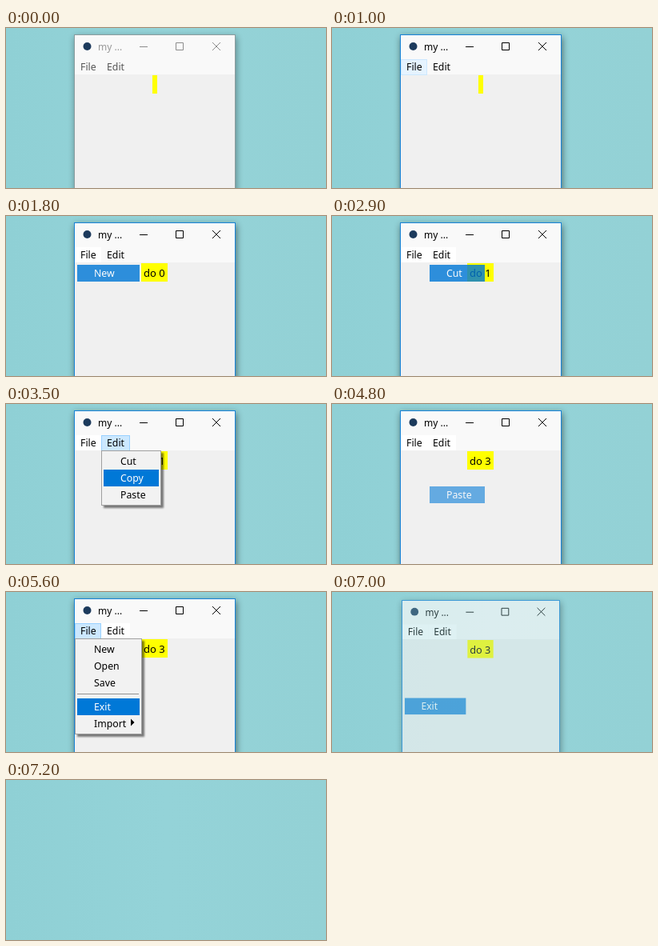
These frames come from a looping animation (400x200 px, 7.6 s). An HTML page:

```html
<!DOCTYPE html>
<html lang="en">
<head>
<meta charset="utf-8">
<title>Menu demo</title>
<style>
  html, body { margin: 0; width: 100%; height: 100%; overflow: hidden; }
  svg { display: block; width: 400px; height: 200px; }
  text { font: 12.3px "Noto Sans", "Open Sans", sans-serif; white-space: pre; }
</style>
</head>
<body>
<svg id="stage" viewBox="0 0 400 200" xmlns="http://www.w3.org/2000/svg">
  <defs>
    <linearGradient id="desk">
      <stop offset="0" stop-color="#8fd0d5"/>
      <stop offset=".5" stop-color="#94d3d8"/>
      <stop offset="1" stop-color="#93d1d5"/>
    </linearGradient>
    <filter id="soft" x="-20%" y="-20%" width="140%" height="140%">
      <feGaussianBlur stdDeviation="4.5"/>
    </filter>
    <filter id="drop" x="-10%" y="-10%" width="120%" height="120%">
      <feGaussianBlur stdDeviation="1"/>
    </filter>
  </defs>
  <rect width="400" height="200" fill="url(#desk)"/>
  <g id="scene"></g>
</svg>
<script>
const LOOP = 7600;
const scene = document.getElementById('scene');
const BLUE = '#0078d7';

const menus = {
  File: { x: 86, w: 84, h: 120, tabW: 33, items: { New: 61, Open: 82, Save: 103, Exit: 133, Import: 154 } },
  Edit: { x: 119, w: 75, h: 69, tabW: 36, items: { Cut: 61, Copy: 82, Paste: 103 } }
};

// Each entry replaces the menu state: [time, tab, open, item, fade]
const steps = [
  [0], [1000, 'File'], [1100, 'File', true], [1300, 'File', true, 'New'],
  [1800, 'File', false, 'New', .81], [1900, 'File', false, 'New', .5], [2000, 'File', false, 'New', .2], [2100],
  [2300, 'Edit'], [2400, 'Edit', true], [2500, 'Edit', true, 'Cut'],
  [2900, 'Edit', false, 'Cut', .81], [3000, 'Edit', false, 'Cut', .5], [3100, 'Edit', false, 'Cut', .2],
  [3200, 'Edit'], [3300, 'Edit', true], [3400, 'Edit', true, 'Cut'], [3500, 'Edit', true, 'Copy'],
  [3900, 'Edit', false, 'Copy', .7], [4000, 'Edit', false, 'Copy', .4], [4100],
  [4200, 'Edit'], [4300, 'Edit', true, 'Copy'], [4400, 'Edit', true, 'Paste'],
  [4800, 'Edit', false, 'Paste', .58], [4900, 'Edit', false, 'Paste', .25], [5000, 'File'],
  [5300, 'File', true], [5400, 'File', true, 'Open'], [5500, 'File', true, 'Save'], [5600, 'File', true, 'Exit'],
  [7000, 'File', false, 'Exit', .8], [7100], [7200]
];
const clicks = [1800, 2900, 3900, 4800];

const rect = (x, y, w, h, fill, extra = '') =>
  `<rect x="${x}" y="${y}" width="${w}" height="${h}" fill="${fill}" ${extra}/>`;
const frame = (x, y, w, h, fill, stroke) =>
  rect(x + .5, y + .5, w - 1, h - 1, fill, `stroke="${stroke}"`);
const label = (x, y, text, fill = '#000', size = 12.3) =>
  `<text x="${x}" y="${y}" fill="${fill}" style="font-size:${size}px">${text}</text>`;
const lines = (d, color) => `<path d="${d}" fill="none" stroke="${color}"/>`;

function drawWindow(active) {
  const ink = active ? '#000' : '#8c8c8c';
  return rect(86, 11, 202, 210, '#000', `opacity="${active ? .5 : .38}" filter="url(#soft)"`) +
    frame(85, 8, 202, 220, '#f0f0f0', active ? '#1883d7' : '#8b9c9e') +
    rect(86, 9, 200, 49, '#f9f9f9') +
    '<circle cx="101.5" cy="23" r="5" fill="#1c3a5c"/>' +
    label(115, 28, 'my ...', active ? '#000' : '#999', 12) +
    lines('M167 23.5h10M212.5 18.5h9v9h-9z', ink) +
    lines('M258 18l10 10M268 18l-10 10', ink);
}

function drawCounter(t) {
  const count = clicks.filter(c => t >= c).length - 1;
  return count < 0
    ? rect(183, 59, 6, 23, '#ff0')
    : rect(169, 59, 33, 23, '#ff0') + label(172, 76, 'do ' + count, '#000', 13);
}

function drawTabs(t, tab, open, fade) {
  const ink = t < 1000 ? '#555' : '#000';
  return Object.entries(menus).map(([name, m]) => {
    const used = t >= (name === 'File' ? 1000 : 2300);
    let back = used ? rect(m.x, 39, m.tabW, 19, '#fff') : '';
    if (name === tab && !fade) {
      back = frame(m.x, 39, m.tabW, 20, open ? '#cce8ff' : '#e5f3ff', open ? '#99d1ff' : '#cce8ff');
    }
    return back + label(m.x + 7, 53, name, ink);
  }).join('');
}

function drawItem(m, name, selected) {
  const y = m.items[name];
  return (selected ? rect(m.x + 3, y, m.w - 6 + (m.x === 119 ? 0 : 0), 21, BLUE) : '') +
    label(m.x + 24, y + 15, name, selected ? '#fff' : '#000');
}

function drawMenu(tab, open, item, fade) {
  const m = menus[tab];
  if (fade) return `<g opacity="${fade}">${drawItem(m, item, true)}</g>`;
  if (!open) return '';
  let out = rect(m.x + 3, 61, m.w, m.h, '#000', 'opacity=".5" filter="url(#drop)"') +
    frame(m.x, 58, m.w, m.h, '#f2f2f2', '#a0a0a0');
  for (const name in m.items) out += drawItem(m, name, name === item);
  if (tab === 'File') {
    out += lines('M89 127.5h77', '#919191') + '<path d="M156 158.5l4.5 4.5-4.5 4.5z"/>';
  }
  return out;
}

function render(t) {
  if (t >= 7200) {
    scene.innerHTML = '';
    return;
  }
  const [, tab, open, item, fade] = steps.findLast(s => s[0] <= t);
  scene.innerHTML = drawWindow(t >= 1000) + drawTabs(t, tab, open, fade) +
    drawCounter(t) + (tab ? drawMenu(tab, open, item, fade) : '');

  const closing = t < 7000 ? 0 : t < 7100 ? 1 : 2;
  const scale = [1, .98, .94][closing];
  scene.setAttribute('opacity', [1, .7, .25][closing]);
  scene.setAttribute('transform', `translate(186 109) scale(${scale}) translate(-186 -109)`);
}

let shown = -1;
function tick() {
  const t = Math.floor(performance.now() % LOOP / 100) * 100;
  if (t !== shown) render(shown = t);
  requestAnimationFrame(tick);
}
tick();
</script>
</body>
</html>
```
